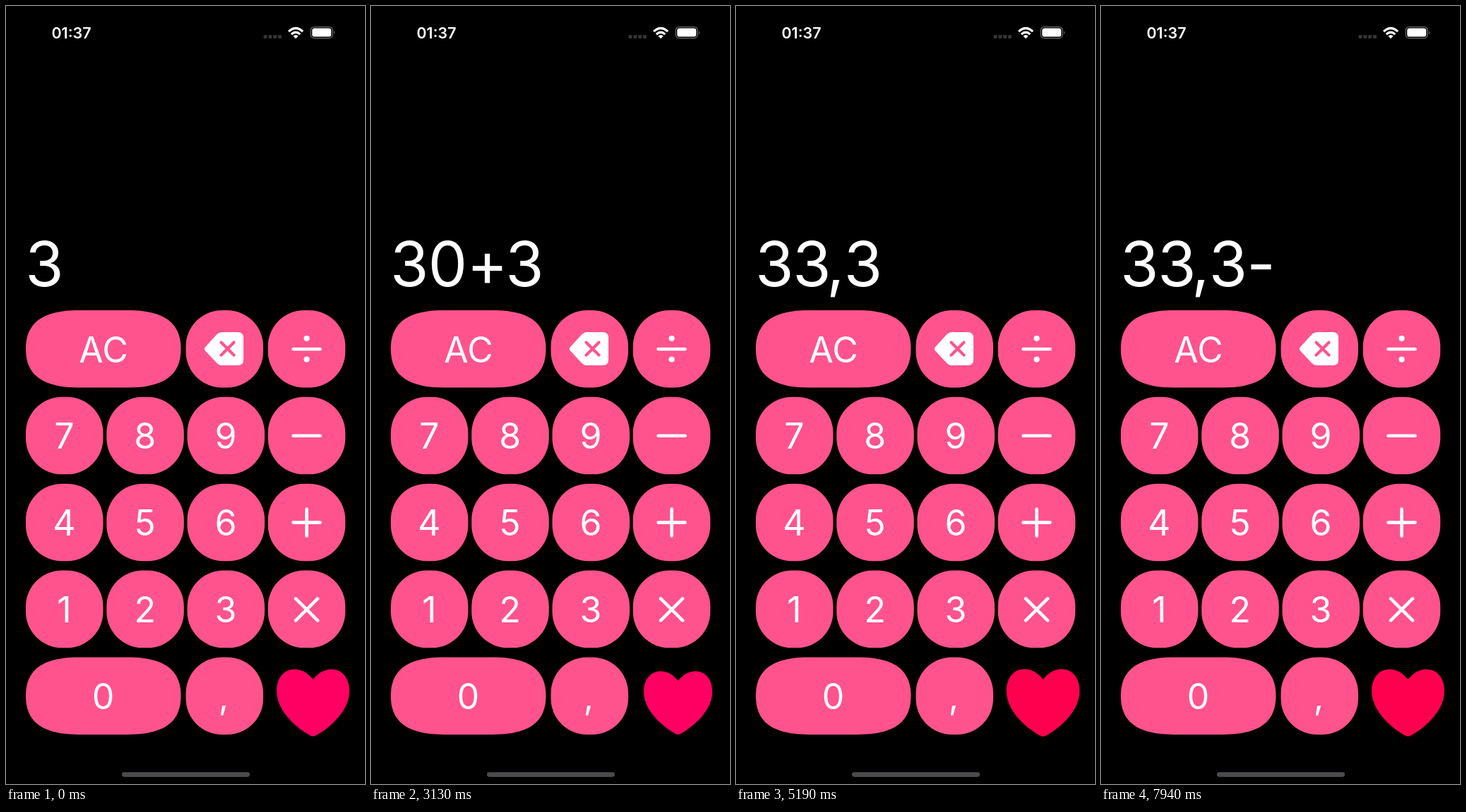
An HTML page for the animation above (8 s loop, 508 px wide and 1102 px high).

```html
<!DOCTYPE html>
<html lang="en">
<head>
<meta charset="utf-8">
<title>Calculator</title>
<style>
  html, body { margin: 0; width: 100%; height: 100%; overflow: hidden; background: #000; }
  svg { display: block; width: 508px; height: 1102px; font-family: Inter, Roboto, sans-serif; }
  text { fill: #fff; text-anchor: middle; }
  .key { fill: #ff538d; }
  .label { font-size: 50px; }
  .icon { fill: none; stroke: #fff; stroke-width: 4.6; stroke-linecap: round; }
  #display { font-size: 88px; }
</style>
</head>
<body>
<svg id="stage" viewBox="0 0 508 1102">
  <rect width="508" height="1102"/>

  <text x="92.5" y="46" font-size="21.5" font-weight="600">01:37</text>
  <g fill="#353538">
    <rect x="364.5" y="41" width="5" height="5" rx="1.3"/>
    <rect x="371.3" y="41" width="5" height="5" rx="1.3"/>
    <rect x="378.1" y="41" width="5" height="5" rx="1.3"/>
    <rect x="384.9" y="41" width="5" height="5" rx="1.3"/>
  </g>
  <g fill="none" stroke="#fff" stroke-width="3.2">
    <path d="M400 36.2Q410 26.8 420 36.2"/>
    <path d="M403.8 40.2Q410 34.4 416.2 40.2"/>
  </g>
  <path d="M406.4 42.6Q410 39.4 413.6 42.6L410 46.3Z" fill="#fff"/>
  <rect x="431.2" y="29.6" width="31" height="16" rx="5" fill="none" stroke="#68686b" stroke-width="1.3"/>
  <rect x="433.2" y="31.6" width="27" height="12" rx="3.4" fill="#fff"/>
  <path d="M464 35.2Q466.4 37.6 464 40.2Z" fill="#68686b"/>

  <text id="display" y="396.5"></text>
  <g id="keys"></g>

  <path d="M281.8 483.2L298 465.6Q301.3 462 306 462H328Q336 462 336 470V501Q336 509 328 509H306Q301.3 509 298 505.4L281.8 488.2Q279.8 485.7 281.8 483.2Z" fill="#fff"/>
  <path id="erase" d="M304.5 476.5l18 18m0-18l-18 18" fill="none" stroke="#ff538d" stroke-width="4.2" stroke-linecap="round"/>
  <path class="icon" d="M406.5 486h38M406.5 608.8h38M406.5 731.6h38M425.5 712.6v38M410 839.4l31 31m0-31l-31 31"/>
  <circle cx="425.5" cy="470.8" r="4.1" fill="#fff"/>
  <circle cx="425.5" cy="500.6" r="4.1" fill="#fff"/>

  <path id="heart" d="M0-38C-8-49-19-55-30-55C-48-55-59.5-40-59.5-19.500C-59.5 9-36 35-6 53Q0 57 6 53C36 35 59.5 9 59.5-19.500C59.5-40 48-55 30-55C19-55 8-49 0-38Z"/>
  <rect x="164" y="1085.3" width="181" height="6.6" rx="3.3" fill="#4b4b4d"/>
</svg>
<script>
const NS = 'http://www.w3.org/2000/svg';
const LOOP = 8000, STEP = 62.5;
const SIZE = 109.5, TOP = 431, PITCH = 122.85;
const COLS = [28, 142.3, 256.5, 370.7];
const $ = id => document.getElementById(id);

function make(tag, attrs, parent) {
  const el = document.createElementNS(NS, tag);
  for (const name in attrs) el.setAttribute(name, attrs[name]);
  parent.append(el);
  return el;
}

// Wide keys have long, softly tapering corners.
function widePath(x, y, w) {
  const h = SIZE, m = h / 2, r = x + w, b = y + h;
  return `M${x} ${y + m}C${x} ${y + 24} ${x + 16} ${y} ${x + 75} ${y}H${r - 75}` +
    `C${r - 16} ${y} ${r} ${y + 24} ${r} ${y + m}C${r} ${b - 24} ${r - 16} ${b} ${r - 75} ${b}` +
    `H${x + 75}C${x + 16} ${b} ${x} ${b - 24} ${x} ${y + m}Z`;
}

const keys = {};
function addKey(name, x, row, label, labelX, wide) {
  const y = TOP + row * PITCH, parent = $('keys');
  keys[name] = wide
    ? make('path', { class: 'key', d: widePath(x, y, 219.5) }, parent)
    : make('rect', { class: 'key', x, y, width: SIZE, height: SIZE, rx: 51 }, parent);
  if (label) {
    make('text', { class: 'label', x: labelX, y: y + 73.5 }, parent).textContent = label;
  }
}

addKey('AC', 28, 0, 'AC', 138, true);
addKey('del', 254.5, 0);
['789', '456', '123'].forEach((row, r) =>
  [...row].forEach((d, c) => addKey(d, COLS[c], r + 1, d, COLS[c] + 54.5)));
['÷', '-', '+', '×'].forEach((op, r) => addKey(op, COLS[3], r));
addKey('0', 28, 4, '0', 137.5, true);
addKey(',', 254.5, 4, ',', 308, false);

// Time, shown text, glyph centres
const ENTRIES = [
  [0, '3', [54.5]],
  [875, '30', [54.5, 108.5]],
  [1937, '30+', [54.5, 108.5, 164.5]],
  [2500, '30+3', [54.5, 108.5, 164.5, 217.5]],
  [3750, '33', [54.5, 107.5]],
  [4625, '33,', [54.5, 107.5, 141]],
  [5062, '33,3', [54.5, 107.5, 141, 180]],
  [7812, '33,3-', [54.5, 107.5, 141, 180, 226.5]]
];
// Key, press start, release
const PRESSES = [
  ['+', 1875, 1937], ['3', 2437, 2500], [',', 4500, 4625],
  ['3', 5000, 5062], ['-', 7750, 7812]
];
const FADE = 110;

// Heart width through one beat
const BEAT = [
  [30, 103], [130, 106], [200, 112], [250, 119], [275, 125], [340, 129.5],
  [400, 127.5], [459, 119], [500, 106], [544, 97], [600, 99], [650, 102.4], [668, 103]
];
const PERIOD = 853, FIRST = 22, LAST = 7120;

function heartWidth(t) {
  let p = t - FIRST;
  if (t > 5850) p = t - LAST;
  else if (p > 0) p %= PERIOD;
  const i = BEAT.findIndex(point => point[0] > p);
  if (i < 1) return 103;
  const [t0, w0] = BEAT[i - 1], [t1, w1] = BEAT[i];
  return w0 + (w1 - w0) * (p - t0) / (t1 - t0);
}

function glow(t, down, up) {
  if (t < down) return 0;
  return t <= up ? 1 : Math.max(0, 1 - (t - up) / FADE);
}

let shown = '';
function show(text, centres) {
  if (text === shown) return;
  shown = text;
  $('display').textContent = '';
  [...text].forEach((ch, i) => {
    make('tspan', { x: centres[i] }, $('display')).textContent = ch;
  });
}

function draw(time) {
  const t = Math.floor((time % LOOP + 5) / STEP) * STEP;
  const entry = ENTRIES.filter(e => e[0] <= t).pop();
  show(entry[1], entry[2]);

  const light = {};
  for (const [name, down, up] of PRESSES) {
    light[name] = Math.max(light[name] || 0, glow(t, down, up));
  }
  for (const name in light) {
    const k = light[name];
    keys[name].style.fill = `rgb(255,${Math.round(83 + 50 * k)},${Math.round(141 + 25 * k)})`;
  }

  const heart = $('heart');
  heart.setAttribute('transform', `translate(434.5 987) scale(${heartWidth(t) / 119})`);
  heart.setAttribute('fill', t < 5187 ? '#ff0062' : '#ff004f');
}

const start = performance.now();
function tick() {
  draw(performance.now() - start);
  requestAnimationFrame(tick);
}
tick();
</script>
</body>
</html>
```
